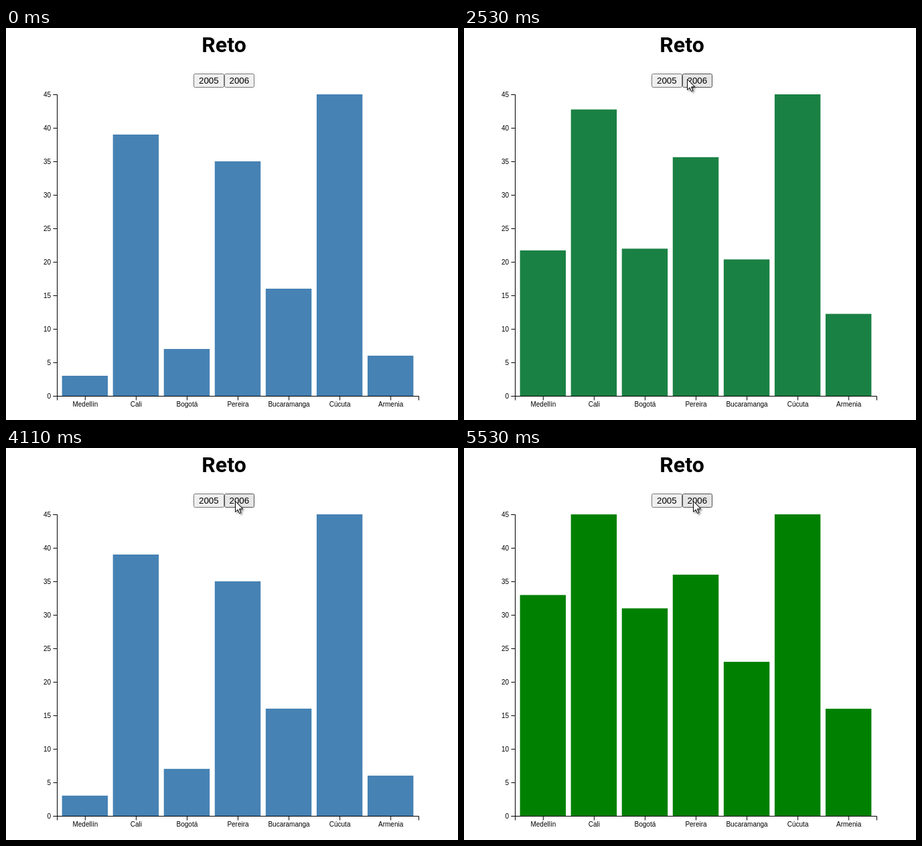
Animation, 675 px wide and 585 px high, one loop 5.76 s. Source, as an HTML page:

```html
<!DOCTYPE html>
<html lang="es">
<head>
<meta charset="utf-8">
<title>Reto</title>
<style>
  html, body { margin: 0; height: 100%; overflow: hidden; background: #fff; }
  svg { display: block; font: 10px "Liberation Sans", Arial, sans-serif; text-anchor: middle; }
  .title { font: bold 32px Roboto, sans-serif; letter-spacing: .2px; }
  .button text { font-size: 13.333px; }
  .button rect { fill: #efefef; stroke: #767676; }
  .button.hover rect { fill: #e5e5e5; stroke: #4f4f4f; }
  .button.active rect { fill: #f5f5f5; stroke: #8d8d8d; }
  .axis { fill: none; stroke: #000; }
  #cursor { fill: #fff; stroke: #000; filter: drop-shadow(2px 2px 1.5px #0007); }
</style>
</head>
<body>
<svg id="stage" width="675" height="585">
  <text class="title" x="325.7" y="36">Reto</text>
</svg>
<script>
const LOOP = 5760, STEP = 78.2, FIRST = 510, DURATION = 1000;
const LEFT = 76, TOP = 99, BOTTOM = 549, WIDTH = 540, UNIT = 10;

const cities = ['Medellín', 'Cali', 'Bogotá', 'Pereira', 'Bucaramanga', 'Cúcuta', 'Armenia'];
const years = [
  { label: 2005, values: [3, 39, 7, 35, 16, 45, 6], color: [70, 130, 180] },
  { label: 2006, values: [33, 45, 31, 36, 23, 45, 16], color: [0, 128, 0] }
];
const clicks = [{ time: 1998, year: 1 }, { time: 3165, year: 0 }, { time: 4584, year: 1 }];

// Cursor path: time, x, y
const path = [
  [510, -2, 90], [666, 90, 76], [900, 220, 69], [1058, 289, 67], [1136, 297, 75],
  [1372, 297, 75], [1526, 323, 75], [1684, 323, 75], [1839, 333, 76],
  [2630, 333, 76], [2933, 310, 77], [3800, 310, 77], [4106, 342, 79], [LOOP, 342, 79]
];

const stage = document.getElementById('stage');
function add(tag, attrs, parent = stage, text = '') {
  const node = document.createElementNS('http://www.w3.org/2000/svg', tag);
  for (const key in attrs) node.setAttribute(key, attrs[key]);
  node.textContent = text;
  return parent.appendChild(node);
}

const buttons = years.map(({ label }, i) => {
  const x = 280 + 45.5 * i;
  const group = add('g', { class: 'button' });
  add('rect', { x: Math.round(x) + .5, y: 68.5, width: 45 - i, height: 20, rx: 2 }, group);
  add('text', { x: x + 22.8, y: 83 }, group, label);
  return group;
});

const band = WIDTH / (cities.length + .1);
const bars = cities.map((city, i) => {
  const x = LEFT + band * (i + .1), width = band * .9;
  const center = x + width / 2 + .5;
  add('text', { x: center, y: BOTTOM + 16.1 }, stage, city);
  add('path', { class: 'axis', d: `M${center} ${BOTTOM + .5}v6` });
  return add('rect', { x, width });
});

for (let value = 0; value <= 45; value += 5) {
  const y = BOTTOM + .5 - value * UNIT;
  add('path', { class: 'axis', d: `M${LEFT + .5} ${y}h-6` });
  add('text', { x: LEFT - 9, y: y + 3.2, 'text-anchor': 'end' }, stage, value);
}
add('path', { class: 'axis', d: `M70.5 ${TOP + .5}h6V${BOTTOM + .5}h-6` });
add('path', { class: 'axis', d: `M76.5 ${BOTTOM + 6.5}v-6h${WIDTH}v6` });

const cursor = add('path', {
  id: 'cursor',
  d: 'M.5 .5V16.3L4.1 12.9 6.5 18.5 8.9 17.5 6.5 11.9H11.6Z'
});

const mix = (a, b, k) => a + (b - a) * k;
const cubicInOut = k => k < .5 ? 4 * k ** 3 : 1 - 4 * (1 - k) ** 3;

function cursorAt(time) {
  const next = Math.max(1, path.findIndex(point => point[0] >= time));
  const [t0, x0, y0] = path[next - 1], [t1, x1, y1] = path[next];
  const k = (time - t0) / (t1 - t0);
  return [mix(x0, x1, k), mix(y0, y1, k)];
}

// Share of the second year shown in the bars, 0 to 1
function yearMix(time) {
  const click = clicks.filter(c => c.time <= time).pop();
  if (!click) return 0;
  const k = cubicInOut(Math.min(1, (time - click.time) / DURATION));
  return click.year ? k : 1 - k;
}

function draw(time) {
  const k = yearMix(time), [from, to] = years;
  const color = `rgb(${from.color.map((c, i) => Math.round(mix(c, to.color[i], k)))})`;
  bars.forEach((bar, i) => {
    const height = UNIT * mix(from.values[i], to.values[i], k);
    bar.setAttribute('y', BOTTOM - height);
    bar.setAttribute('height', height);
    bar.setAttribute('fill', color);
  });

  const visible = time >= FIRST;
  const [x, y] = visible ? cursorAt(time) : [-50, 0];
  cursor.setAttribute('visibility', visible ? 'visible' : 'hidden');
  cursor.setAttribute('transform', `translate(${Math.round(x)} ${Math.round(y)})`);

  const pressed = clicks.some(c => time > c.time - 85 && time < c.time + 10);
  buttons.forEach((button, i) => {
    const over = y >= 68 && y < 89 && x >= 280 + 46 * i && x < 326 + 45 * i;
    button.setAttribute('class', 'button' + (over ? pressed ? ' active' : ' hover' : ''));
  });
}

// The picture advances in steps, like a screen recording
function tick() {
  const time = performance.now() % LOOP;
  draw(FIRST + Math.floor((time - FIRST) / STEP + .2) * STEP);
  requestAnimationFrame(tick);
}
tick();
</script>
</body>
</html>
```
